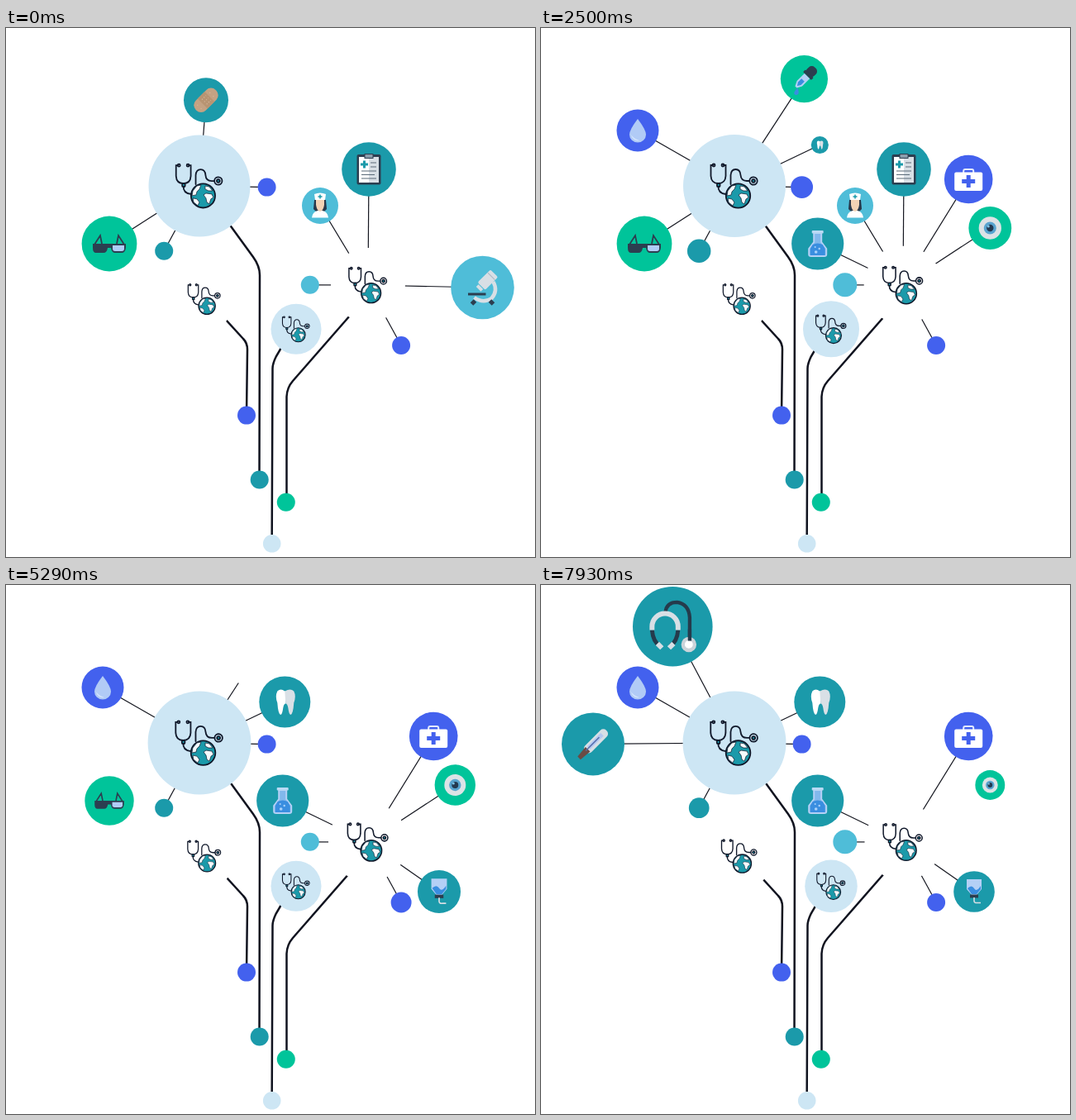
An HTML page for the animation above (8000 ms loop, 640x640 px).

```html
<!DOCTYPE html>
<html lang="en">
<head>
<meta charset="utf-8">
<title>Health network tree</title>
<style>
  html, body { margin: 0; width: 100%; height: 100%; overflow: hidden; background: #fff; }
  svg { display: block; width: 100vw; height: 100vh; }
</style>
</head>
<body>
<svg id="stage" viewBox="0 0 640 640">
  <g id="spokes" stroke="#14161f" stroke-width="1.2"></g>
  <g fill="none" stroke="#10131f" stroke-width="2.5">
    <path d="M255 216.5L299 277Q307 288 307 299L306.5 546"/>
    <path d="M244 329L287 376Q292 381 292 389L291 468"/>
    <path d="M437 324L347 427Q340 435 339.5 446V574"/>
    <path d="M344 368L327 397Q322.500 406 322.500 412L321.700 613"/>
  </g>
  <circle cx="306.700" cy="546.500" r="11" fill="#1b9aaa"/>
  <circle cx="291" cy="468.600" r="11" fill="#4361ee"/>
  <circle cx="338.800" cy="573.800" r="11" fill="#00c49a"/>
  <circle cx="321.700" cy="623.800" r="10.800" fill="#cde6f4"/>
  <g id="hubs"></g>
  <g id="nodes"></g>
</svg>
<script>
const LOOP = 8000, GROW = 1000, SHRINK = 1200;
const TEAL = '#1b9aaa', GREEN = '#00c49a', BLUE = '#4361ee', CYAN = '#4fbdd8', PALE = '#cde6f4';
const DARK = '#2c3e50', GREY = '#d8dfe5', SKY = '#b4d0f6', FLUID = '#3a8ee0';

const globeIcon = `
  <g fill="none" stroke="#10182a" stroke-width="1.8" stroke-linecap="round">
    <path d="M-26 -25H-28.500V-12Q-28 -3 -19.500 -3T-10.500 -12V-25H-13"/>
    <path d="M-19.500 0Q-20 9 -10.500 10"/>
    <path d="M-4.500 -2V-13Q-4 -20 1.500 -20Q7 -20 7.500 -13Q8 -6 15 -6H18"/>
    <circle cx="-25" cy="-25" r="1.500"/><circle cx="-14" cy="-25" r="1.500"/>
    <rect x="-21" y="-3" width="3.500" height="4" rx="1" fill="${TEAL}"/>
    <circle cx="23" cy="-6" r="4.700"/><circle cx="23" cy="-6" r="1.900" fill="${TEAL}"/>
    <circle cx="4.500" cy="12" r="14.700" fill="${TEAL}"/>
  </g>
  <g fill="#f4fafd" stroke="#10182a" stroke-width=".7">
    <path d="M5 11L8 9L15 10L17 14L14 16L12 22L9 20L8 15Z"/>
    <path d="M7 0L12 1L16 6L11 6L7 4Z"/>
    <path d="M-8 6L-3 0L2 -1L0 4L-3 7L-4 11L-9 12Z"/>
    <path d="M-8 15L-3 16L0 20L-2 24L-7 20Z"/>
  </g>`;

const icons = {
  bandage: `<g transform="rotate(-45)"><rect x="-17" y="-8.500" width="34" height="17" rx="8" fill="#c4a283"/>
    <rect x="-6" y="-8.500" width="12" height="17" fill="#b89472"/>
    <path d="M-3 -4H4M-3 0H4M-3 4H4M-12 -3H-9M-12 3H-9M9 -3H12M9 3H12" stroke="#d6b89b" stroke-width="1.200" stroke-dasharray="1.200 2"/></g>`,
  glasses: `<path d="M-18 1L-11 -10L-9 0M18 1L11 -10L9 0" fill="none" stroke="${DARK}" stroke-width="1.800"/>
    <path d="M-20 0H20V5Q19 11 15 11H7Q3 11 2 5H-2Q-3 11 -7 11H-16Q-20 11 -20 5Z" fill="${DARK}"/>
    <path d="M4 2H18V6Q18 9 15 9H7Q4 9 4 6Z" fill="#b0cdf7"/>`,
  clipboard: `<rect x="-14.500" y="-18" width="29" height="36.500" rx="2" fill="${DARK}"/>
    <path d="M-12 -15H0V16H-12Z" fill="#fff"/><path d="M0 -15H12V16H0Z" fill="${GREY}"/>
    <rect x="-5" y="-18.500" width="10" height="5" fill="#8b9dac" stroke="${DARK}"/>
    <path d="M-10 -6H-1M-5.500 -10.500V-1.500" stroke="${TEAL}" stroke-width="3"/>
    <path d="M2 -8H9M2 -3H9M-9 2H9M-9 6.500H7M-9 11H9" stroke="#5b6b79" stroke-width="1.100"/>`,
  nurse: `<path d="M-7 -7H7L8 4Q5 8 0 8T-8 4Z" fill="#28384a"/>
    <path d="M-10 14.500Q-9 7 -3 6H3Q9 7 10 14.500Z" fill="#fff"/>
    <path d="M-5 -8H5V-1Q4 6 0 7Q-4 6 -5 -1Z" fill="#f2d2b4"/>
    <path d="M-7 -14Q0 -17 7 -14L6 -7H-6Z" fill="#fff"/>
    <path d="M-2.500 -11H2.500M0 -13.500V-8.500" stroke="${TEAL}" stroke-width="1.500"/>`,
  microscope: `<path d="M13 -7Q19 4 11 13Q1 20 -10 12" fill="none" stroke="${GREY}" stroke-width="4.500"/>
    <g transform="translate(5 -8) rotate(45)"><rect x="-6.500" y="-13" width="13" height="22" rx="2" fill="${GREY}"/>
    <rect x="-4" y="10" width="8" height="4" fill="${GREY}"/><path d="M-6 -8H6" stroke="#aab7c3"/></g>
    <path d="M-17.500 8H4" stroke="${DARK}" stroke-width="3"/>
    <path d="M-13 20L-9 16M13 20L9 16" stroke="${DARK}" stroke-width="5"/>`,
  dropper: `<g transform="rotate(45)"><rect x="-6" y="-19" width="12" height="13" rx="5" fill="${DARK}"/>
    <rect x="-7" y="-9" width="14" height="4" rx="1" fill="${DARK}"/>
    <path d="M-4.500 -5H4.500V8L1.500 14H-1.500L-4.500 8Z" fill="${SKY}"/>
    <path d="M-2.500 2H2.500V8L0 12L-2.500 8Z" fill="${FLUID}"/></g>
    <path d="M-8 11Q-13 16 -12 18Q-10 21 -7 18Q-6 16 -8 11Z" fill="${FLUID}"/>`,
  medkit: `<path d="M-6 -8V-10Q-6 -12 -4 -12H4Q6 -12 6 -10V-8" fill="none" stroke="#e3eafd" stroke-width="2"/>
    <rect x="-17" y="-8.500" width="34" height="22.500" rx="2" fill="#fff"/>
    <path d="M-8 2.500H8M0 -5V10" stroke="${BLUE}" stroke-width="5"/>`,
  flask: `<path d="M-4.500 -13V-2L-10.500 6V13Q-10.500 15 -8 15H8Q10.500 15 10.500 13V6L4.500 -2V-13Z" fill="#82b8ec" stroke="${SKY}" stroke-width="2"/>
    <path d="M-6 1Q0 -2 6 1L9 6V14H-9V6Z" fill="${FLUID}"/>
    <rect x="-7" y="-16" width="14" height="3.500" rx="1" fill="#b9daf4"/>
    <g fill="#a9d2fa"><circle cx="-2" cy="10" r="1.800"/><circle cx="2" cy="6" r="1.200"/><circle cx="-3" cy="4" r="1"/></g>`,
  drop: `<path d="M0 -14Q10 -1 10 5A10 9.500 0 0 1 -10 5Q-10 -1 0 -14Z" fill="#b1cbf6"/>
    <path d="M-8 5A8 8 0 0 0 2 12Q-5 10 -8 5Z" fill="#d5e5fc"/>`,
  tooth: `<path d="M0 -13Q-5 -17 -9 -13Q-12 -7 -9 1Q-8 15 -5 15.500Q-3 15 -2 7Q-1 2 1 2V-13Z" fill="#fff"/>
    <path d="M0 -13Q7 -17 11 -13Q14 -7 11 1Q10 15 7 15.500Q5 15 4 7Q3 2 1 2Z" fill="#d9e0e6"/>`,
  eye: `<circle r="13" fill="#dce3e6"/><circle r="7.200" fill="#58a4d0"/><circle r="4" fill="#243950"/><circle cx="-2" cy="-2" r="1.500" fill="#7ac3e7"/>`,
  drip: `<path d="M-9 -15H9V-3L3 4H-3L-9 -3Z" fill="${SKY}"/>
    <path d="M-8 -4Q-3 -9 0 -4T8 -7V-3L3 3H-3Z" fill="${FLUID}"/>
    <path d="M-5 5.500H5" stroke="${DARK}" stroke-width="4"/>
    <path d="M0 7V11Q0 14 4 13.500H8" fill="none" stroke="${GREY}" stroke-width="1.600"/>`,
  thermometer: `<g transform="rotate(45)"><rect x="-5.500" y="-23" width="11" height="36" rx="5" fill="${GREY}"/>
    <path d="M-4 9H4L2.500 24H-2.500Z" fill="#6a4b45"/><rect x="-3" y="-16" width="5" height="23" fill="#b5c9f1"/>
    <path d="M-.5 -11V12" stroke="#536aa9" stroke-width="1.500"/></g>`,
  stethoscope: `<g fill="none" stroke-width="5.500"><path d="M-8 -16Q-7 -27 5 -27Q18 -25 19 -10V16" stroke="#253b4c" stroke-width="4"/>
    <path d="M-23 4Q-22 17 -14 22M6 4Q5 17 -3 22" stroke="#253b4c" stroke-width="4.500"/>
    <path d="M-23 4V0A14.500 14.500 0 0 1 6 0V4" stroke="${GREY}"/>
    <path d="M-17 19L-12 24M1 19L-4 24" stroke="${GREY}"/></g>
    <circle cx="18" cy="20" r="8.500" fill="#cbd3d9"/><circle cx="18" cy="20" r="4.500" fill="#fff"/>
    <path d="M19 3V16" stroke="#253b4c" stroke-width="4"/>`
};

const hubs = {
  a: { x: 234, y: 191, r: 62, fill: PALE, icon: 1, radius: t => track(t, [[0, 61.5], [1000, 63], [2500, 62], [4210, 62.4], [8000, 62.5]]) },
  b: { x: 438, y: 311, r: 45, fill: '#fff', icon: .81, radius: t => track(t, [[0, 45], [1000, 47.3], [2500, 47.3], [4210, 45], [5290, 48], [6430, 48], [8000, 46.5]]) },
  c: { x: 240, y: 328, r: 37.5, fill: '#fff', icon: .69, radius: t => 37.5 + 4 * pulse(t, 3200, 0, 2500) ** 2 },
  d: { x: 351, y: 364.3, r: 30.5, fill: PALE, icon: .58, radius: t => 30.5 + 4.3 * pulse(t, 1840, 530, 430) }
};

// enter/leave: start of the bubble's motion; lineIn/lineOut: start and end of the spoke's motion
const nodes = [
  { hub: 'a', x: 242, y: 87.3, r: 27, fill: TEAL, icon: 'bandage', leave: 330, lineOut: [400, 950] },
  { hub: 'a', x: 125, y: 261, r: 33.4, fill: GREEN, icon: 'glasses', leave: 4438, lineOut: [4600, 5200] },
  { hub: 'b', x: 439, y: 171, r: 32.8, fill: TEAL, icon: 'clipboard', leave: 3514, lineOut: [3500, 4100] },
  { hub: 'b', x: 380, y: 215, r: 22, fill: CYAN, icon: 'nurse', leave: 2900, lineOut: [2900, 3500] },
  { hub: 'b', x: 576.5, y: 314, r: 38.3, fill: CYAN, icon: 'microscope', leave: 190, lineOut: [300, 900] },
  { hub: 'b', x: 517.2, y: 183, r: 29.3, fill: BLUE, icon: 'medkit', enter: 200, lineIn: [300, 900] },
  { hub: 'b', x: 334.7, y: 261, r: 31.6, fill: TEAL, icon: 'flask', enter: 250, lineIn: [300, 900] },
  { hub: 'a', x: 318.4, y: 61.6, r: 28.6, fill: GREEN, icon: 'dropper', enter: 250, leave: 3960, lineIn: [740, 1240], lineOut: [4970, 5700] },
  { hub: 'a', x: 117, y: 124, r: 25.5, fill: BLUE, icon: 'drop', enter: 980, lineIn: [1300, 2000] },
  { hub: 'b', x: 543.3, y: 242, r: 24.7, fill: GREEN, icon: 'eye', enter: 1710, leave: 6982, lineIn: [1800, 2400], lineOut: [7100, 7800] },
  { hub: 'a', x: 337.3, y: 141.5, r: 31, fill: TEAL, icon: 'tooth', enter: 2420, lineIn: [1900, 2450] },
  { hub: 'b', x: 524, y: 371, r: 24.8, fill: TEAL, icon: 'drip', enter: 4500, lineIn: [4600, 5200] },
  { hub: 'a', x: 63, y: 192.4, r: 38, fill: TEAL, icon: 'thermometer', enter: 5680, lineIn: [5800, 6380] },
  { hub: 'a', x: 159.3, y: 50.2, r: 44.5, fill: TEAL, icon: 'stethoscope', enter: 7250, lineIn: [7300, 7800] },
  { hub: 'a', x: 315.6, y: 192.6, r: 11, fill: BLUE, swell: t => 3.6 * pulse(t, 1900, 430, 720) },
  { hub: 'a', x: 191.2, y: 269.7, r: 11, fill: TEAL, swell: t => 4.3 * pulse(t, 1835, 545, 445) },
  { hub: 'b', x: 367.8, y: 310.8, r: 11, fill: CYAN, swell: t => 5 * pulse(t, 1810, 590, 410) },
  { hub: 'b', x: 478.1, y: 384, r: 11, fill: BLUE, swell: t => 3.6 * pulse(t, 1900, 600, 1030) }
];

const clamp = v => Math.min(1, Math.max(0, v));
const backOut = x => 1 + 2.7 * (x - 1) ** 3 + 1.7 * (x - 1) ** 2;
const backIn = x => x * x * (2.7 * x - 1.7);

function pulse(t, period, start, length) {
  const x = (t % period - start) / length;
  return x > 0 && x < 1 ? Math.sin(Math.PI * x) : 0;
}

function track(t, keys) {
  const i = Math.max(1, keys.findIndex(k => k[0] > t));
  const [t0, v0] = keys[i - 1], [t1, v1] = keys[i];
  return v0 + (v1 - v0) * (1 - Math.cos(Math.PI * (t - t0) / (t1 - t0))) / 2;
}

function add(parent, tag, attrs, content = '') {
  const el = document.createElementNS('http://www.w3.org/2000/svg', tag);
  set(el, attrs);
  el.innerHTML = content;
  return document.getElementById(parent).appendChild(el);
}

function set(el, attrs) {
  for (const key in attrs) el.setAttribute(key, attrs[key]);
}

for (const hub of Object.values(hubs)) {
  hub.el = add('hubs', 'g', {},
    `<circle r="${hub.r}" fill="${hub.fill}"/><g transform="scale(${hub.icon})">${globeIcon}</g>`);
}
for (const node of nodes) {
  const { x, y } = hubs[node.hub];
  node.line = add('spokes', 'line', { x1: x, y1: y });
  node.el = add('nodes', 'g', {}, `<circle r="${node.r}" fill="${node.fill}"/>${icons[node.icon] || ''}`);
}

function place(el, x, y, scale) {
  set(el, { transform: `translate(${x} ${y}) scale(${scale})`, visibility: scale > .005 ? 'visible' : 'hidden' });
}

function nodeScale(node, t) {
  if (node.swell) return 1 + node.swell(t) / node.r;
  if (node.leave !== undefined && t > node.leave) return 1 - backIn(clamp((t - node.leave) / SHRINK));
  return node.enter === undefined ? 1 : backOut(clamp((t - node.enter) / GROW));
}

function reach(node, t) {
  const part = ([from, to]) => clamp((t - from) / (to - from));
  return (node.lineIn ? part(node.lineIn) : 1) - (node.lineOut ? part(node.lineOut) : 0);
}

function draw(now) {
  const t = now % LOOP;
  for (const hub of Object.values(hubs)) place(hub.el, hub.x, hub.y, hub.radius(t) / hub.r);
  for (const node of nodes) {
    const hub = hubs[node.hub], p = reach(node, t);
    place(node.el, node.x, node.y, nodeScale(node, t));
    set(node.line, { x2: hub.x + (node.x - hub.x) * p, y2: hub.y + (node.y - hub.y) * p });
  }
}

const start = performance.now();
(function tick() {
  draw(performance.now() - start);
  requestAnimationFrame(tick);
})();
</script>
</body>
</html>
```
